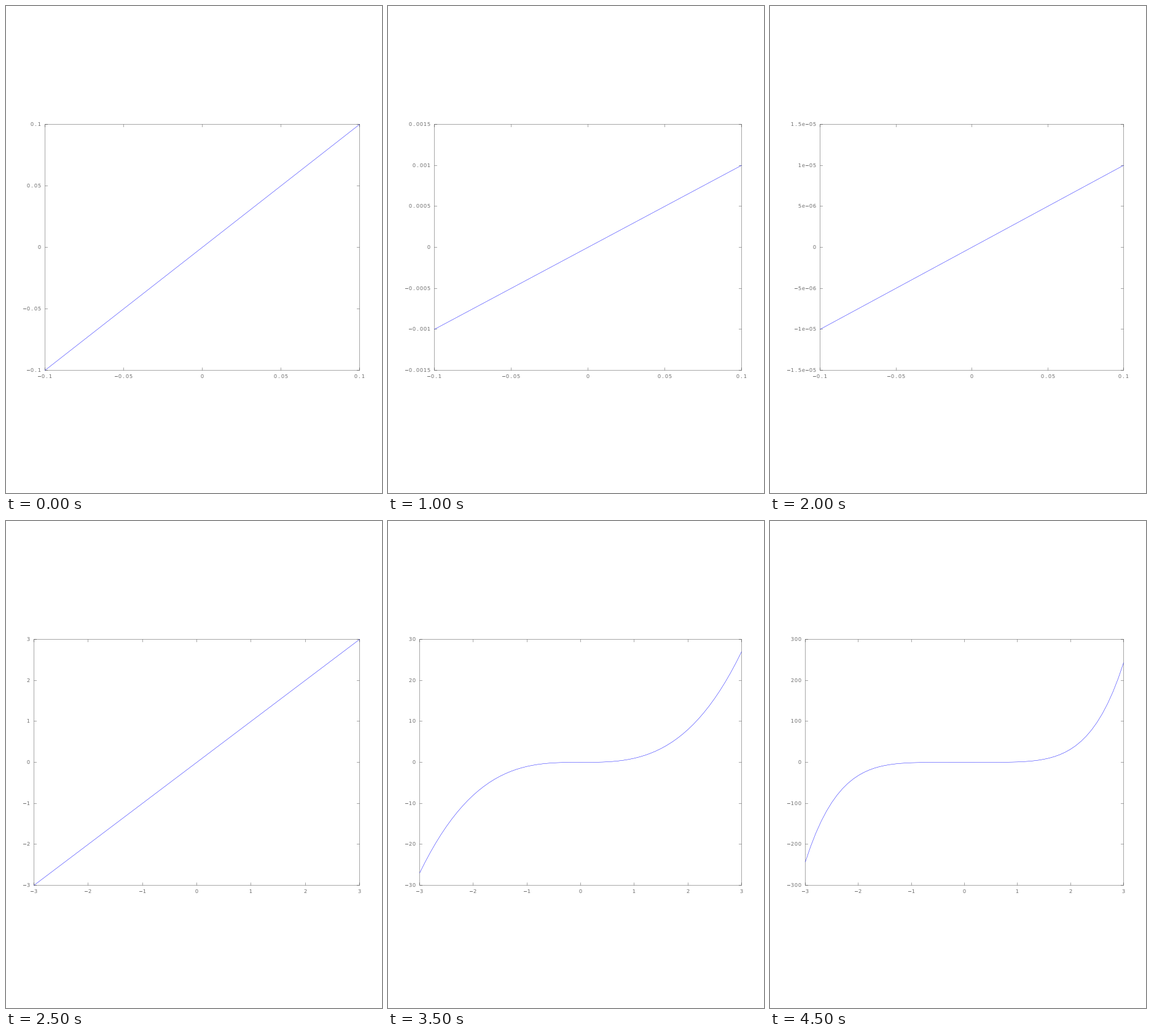
Write a matplotlib script that moves like this. It is 612 px wide and 792 px high and loops after 5000 ms.

```python
import numpy as np
import matplotlib.pyplot as plt
from matplotlib.animation import FuncAnimation
from matplotlib.collections import LineCollection
from matplotlib.patches import PathPatch
from matplotlib.textpath import TextPath
from matplotlib.transforms import Affine2D

W, H, DPI = 612, 792, 72
RIGHT, TOP, BOTTOM = 575.5, 192.5, 592.5
CELL, SIZE, TICK = 6, 8.3, 4.5
INK = "#707070"
FRAME_LW, CURVE_LW = 0.34, 0.45

NARROW = np.array([-0.1, 0, 0.1])
WIDE = np.linspace(-3, 3, 61)

# x values, x step, power, y step, first and last y tick as multiples of the step
PLOTS = [
    (NARROW, 0.05, 1, 0.05, -2, 2),
    (NARROW, 0.05, 2, 0.002, 0, 6),
    (NARROW, 0.05, 3, 0.0005, -3, 3),
    (NARROW, 0.05, 4, 2e-05, 0, 6),
    (NARROW, 0.05, 5, 5e-06, -3, 3),
    (WIDE, 1, 1, 1, -3, 3),
    (WIDE, 1, 2, 2, 0, 5),
    (WIDE, 1, 3, 10, -3, 3),
    (WIDE, 1, 4, 20, 0, 5),
    (WIDE, 1, 5, 100, -3, 3),
]

fig = plt.figure(figsize=(W / DPI, H / DPI), dpi=DPI, facecolor="white")
ax = fig.add_axes([0, 0, 1, 1])
glyphs = {}


def glyph(ch):
    if ch not in glyphs:
        path = TextPath((0, 0), "\u2212" if ch == "-" else ch, size=SIZE)
        box = path.get_extents()
        glyphs[ch] = path, (box.x0 + box.x1) / 2
    return glyphs[ch]


def label(text, left, baseline):
    """Write text with one character per fixed-width cell."""
    for i, ch in enumerate(text):
        path, mid = glyph(ch)
        x = left + CELL * (i + 0.5) - mid
        place = Affine2D().scale(1, -1).translate(x, baseline)
        ax.add_patch(PathPatch(place.transform_path(path), fc=INK, lw=0))


def lines(segments):
    group = LineCollection(segments, colors="black", linewidths=FRAME_LW,
                           capstyle="butt")
    group.set_snap(False)
    ax.add_collection(group, autolim=False)


def draw(i):
    xs, xstep, power, ystep, lo, hi = PLOTS[i]
    ax.clear()
    ax.set(xlim=(0, W), ylim=(H, 0))
    ax.axis("off")

    ynames = [f"{k * ystep:g}" for k in range(lo, hi + 1)]
    left = 33.5 + CELL * max(map(len, ynames))
    xmax = xs[-1]

    def px(x):
        return left + (x + xmax) / (2 * xmax) * (RIGHT - left)

    def py(y):
        return BOTTOM - (y / ystep - lo) / (hi - lo) * (BOTTOM - TOP)

    lines([[(left, TOP), (RIGHT, TOP)], [(left, BOTTOM), (RIGHT, BOTTOM)],
           [(left, TOP), (left, BOTTOM)], [(RIGHT, TOP), (RIGHT, BOTTOM)]])

    ticks = []
    for k, name in zip(range(lo, hi + 1), ynames):
        y = np.floor(py(k * ystep)) + 0.5
        ticks += [[(left, y), (left + TICK, y)], [(RIGHT, y), (RIGHT - TICK, y)]]
        label(name, left - CELL * (len(name) + 1), y + 2.5)

    n = round(xmax / xstep)
    for k in range(-n, n + 1):
        x = np.floor(px(k * xstep)) + 0.5
        name = f"{k * xstep:g}"
        ticks += [[(x, BOTTOM), (x, BOTTOM - TICK)], [(x, TOP), (x, TOP + TICK)]]
        label(name, x - CELL * len(name) / 2, BOTTOM + 12.5)
    lines(ticks)

    ax.plot(px(xs), py(xs ** power), color="blue", lw=CURVE_LW, snap=False,
            solid_capstyle="butt", solid_joinstyle="round")
    return []


anim = FuncAnimation(fig, draw, frames=len(PLOTS), interval=500,
                     repeat=True, repeat_delay=0)
plt.show()
```
